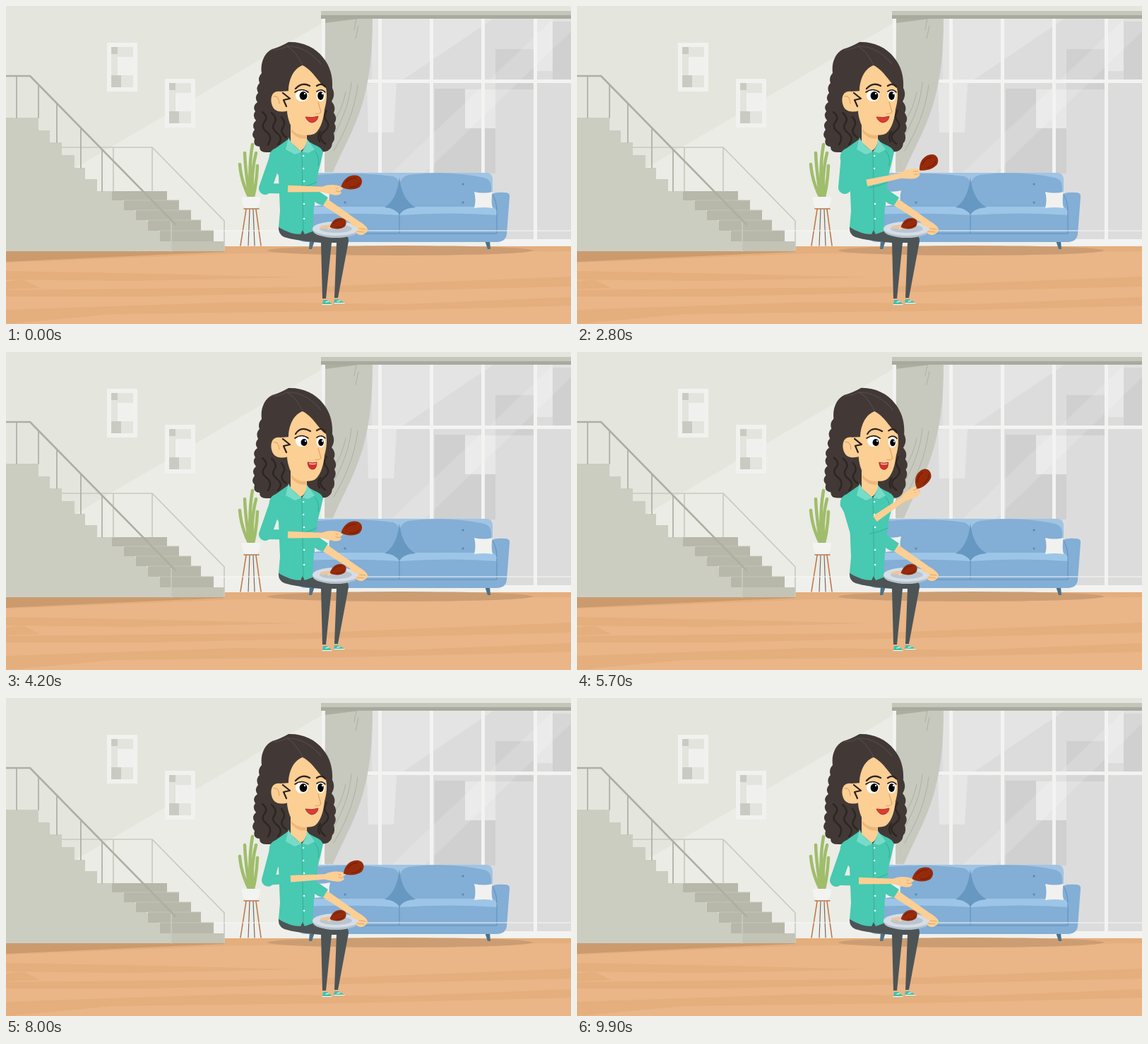
Write an HTML page that moves like this. It is 800 px wide and 450 px high and loops after 10000 ms.

```html
<!DOCTYPE html>
<html lang="en">
<head>
<meta charset="utf-8">
<title>Snack on the sofa</title>
<style>
html, body { margin: 0; width: 100%; height: 100%; overflow: hidden; background: #e4e5dd; }
svg { display: block; width: 100vw; height: 100vh; }
.line { fill: none; stroke-linecap: round; stroke-linejoin: round; }
.teal { fill: #48c9b1; }
.skin { fill: #fccf94; }
</style>
</head>
<body>
<svg viewBox="0 0 800 450">
<defs>
  <g id="picture">
    <path fill="#f1f2ef" d="M143 52h43v69h-43z"/>
    <path fill="#e2e4dd" d="M149 58h31v57h-31z"/>
    <path fill="#c9cbc3" d="M149 58h9v10h-9zM149 98h14v17h-14z"/>
    <path fill="#f0f1ef" d="M158 72h22v26h-22z"/>
  </g>
  <g id="drumstick">
    <path class="line" stroke="#f3cfa4" stroke-width="3.5" d="M-12 5L-18 8"/>
    <path fill="#962b0b" d="M-15 5C-11-6-3-11 6-10C16-9 18 1 11 7C4 11-8 10-15 5Z"/>
    <path class="line" stroke="#7b1e07" stroke-width="1.3" d="M-8-1Q-1-8 7-6M-3 6Q6 8 11 2"/>
  </g>
</defs>

<!-- wall -->
<path fill="#e4e5dd" d="M0 0h800v345H0z"/>
<path fill="#ebece5" d="M450 23L100 228V342H450z"/>
<path fill="#eff0ec" d="M290 318h510v24H290z"/>
<use href="#picture"/>
<use href="#picture" x="82" y="51"/>

<!-- window -->
<g>
  <path fill="#dcdcdd" d="M450 18H800V331H450z"/>
  <path fill="#e4e4e4" d="M518 18H690L518 134z"/>
  <path fill="#d0d0d1" d="M693 61h54v57h-54zM607 117h43v29h43v91h-86zM774 22h26v84h-26z"/>
  <path fill="#e7e7e8" d="M511 110h42l-4 69h-36zM650 118h43v55h-43zM751 18h23v74h-23z"/>
  <path fill="#fff" opacity=".14" d="M775 18H800V36L592 237H545z"/>
  <path fill="#f3f3f2" d="M447 18h5v218h-5zM527 18h5v220h-5zM600 18h5v220h-5zM673 18h5v220h-5zM747 18h5v315h-5zM450 104h350v5H450zM700 330h100v9H700z"/>
</g>
<path fill="#c8c9be" d="M452 18H519C519 60 516 95 508 125C499 165 479 198 463 235H451z"/>
<path fill="#adaea2" d="M452 18h48l-48 6z"/>
<path class="line" stroke="#afb0a5" stroke-width="1" d="M496 18L493 34M499 28L495 46M489 108C486 140 476 160 464 184M498 112C493 150 480 178 464 205M481 122Q476 146 466 160"/>
<path fill="#c5c6bb" d="M446 7h354v7H446z"/>
<path fill="#a9aa9e" d="M446 13h354v5H446z"/>

<!-- floor -->
<path fill="#eab587" d="M0 340h800v110H0z"/>
<g fill="#e4ae7d">
  <path d="M0 340H800V347L330 350L0 363z"/>
  <path d="M0 375L215 379L412 384L180 389L0 387z"/>
  <path d="M24 387L48 399L0 401V390zM0 402L420 398L800 383V397L470 405L200 411L0 411z"/>
  <path d="M0 430L330 419L560 422L800 412V424L520 431L150 436L0 450z"/>
</g>
<path fill="#cb9b6e" d="M0 346H309V348L130 356L0 362z"/>
<ellipse cx="558" cy="346" rx="188" ry="7" fill="#cc9d72"/>

<!-- stairs -->
<path fill="#cccdc1" d="M0 158H46V176H62V193H79V211H97V229H112V245H129V262H150L234 333V347H0z"/>
<path fill="#b7b8a9" d="M150 262H228V275H245V289H262V303H276V318H294V333H309V347H234V333H218V318H201V303H184V289H167V275H150z"/>
<path fill="#c3c4b6" d="M234 333h75v14h-75z"/>
<path class="line" stroke="#c4c5b8" d="M167 275h78M184 289h78M201 303h75M218 318h76"/>
<path class="line" stroke="#c9cac0" stroke-width="1.7" d="M79 200H207L309 304V346M152 200V262M207 200V262M234 306V347"/>
<path class="line" stroke="#aeafa3" stroke-width="1.7" d="M15 99V158M46 111V158M72 138V193M106 172V229M136 203V262"/>
<path class="line" stroke="#aeafa3" stroke-width="2.6" d="M0 99H34L240 309"/>

<!-- plant -->
<path class="line" stroke="#bd784c" stroke-width="1.6" d="M337 287H358M340 288L332 339M354 288L361 339"/>
<path class="line" stroke="#7b6a60" stroke-width="1.2" d="M345 288L343 339M350 288L352 339"/>
<path class="line" stroke="#a0bd6c" stroke-width="4.5" d="M344 270Q333 248 331 224M345 270Q339 235 338 208M347 270Q343 230 349 196M349 270Q347 235 354 208M350 270Q355 250 356 226"/>
<path fill="#f3f3f1" d="M334 270H360Q360 286 352 286H341Q334 286 334 270z"/>

<!-- sofa -->
<path fill="#4d7188" d="M430 332h7l-4 12h-4zM678 332h7l1 12h-4z"/>
<path fill="#a1c4e3" d="M420 236H680Q689 236 689 246V290H420z"/>
<path fill="#83aed5" d="M420 241Q490 233 548 241Q557 244 557 254V290H420zM557 254Q558 242 570 239Q625 232 677 243Q687 246 687 256V290H557z"/>
<path fill="#83aed5" d="M688 267Q691 263 706 264Q714 264 713 270L709 323Q708 333 696 334H425Q411 334 412 320H688z"/>
<path fill="#83aed5" d="M420 284H695V322H420z"/>
<path fill="#9dc5e7" d="M420 284H548Q557 284 556 296Q500 292 420 295zM557 296Q556 284 566 284H688Q695 285 695 296Q630 291 557 296z"/>
<path fill="#6698c1" d="M557 242Q554 274 536 285Q552 286 557 296Q562 286 580 285Q560 274 557 242z"/>
<path class="line" stroke="#5c8fba" stroke-width="1" d="M557 296V321M430 322H695V292M688 265Q695 276 695 290"/>
<path class="line" stroke="#5588b5" stroke-width="3" d="M480 278h.1M647 252h.1M647 278h.1"/>
<path fill="#f1f1ef" d="M663 263Q676 266 689 263Q686 275 689 286Q676 284 663 286Q666 275 663 263zM437 262Q448 264 459 261Q456 272 459 283Q448 281 437 283z"/>
<path stroke="#f7f8f7" stroke-width="1.2" d="M294 318H800"/>

<!-- legs -->
<path fill="#4d5456" d="M386 312L434 318L475 322Q486 324 485 333L470 413H465L468 335H461L453 414H448L446 335Q410 332 394 327Q385 323 386 312z"/>
<path fill="#42c2aa" d="M449 416h5q5 2 7 6h-13zM465 415h5q6 2 9 5h-15z"/>
<path class="line" stroke="#fff" stroke-width="1.2" d="M448 422.5H461M465 420.5H479M453 419l4-1M469 418l4-1"/>

<g class="head">
  <path fill="#423936" d="M400 51C418 50 438 58 449 73C459 85 463 100 462 116C466 124 464 130 461 135q7 8 3 16q6 8 1 15q4 7-1 14q3 9-2 14q-1 10-10 12L440 207H370q-11 1-11-8q-10-1-7-11q-6-6 0-13q-5-7 2-13q-6-7-1-13q-5-7 3-13q-5-7 1-13q-4-8 2-14q-3-8 3-14C360 80 366 66 377 61Q388 58 400 51z"/>
  <g class="line" stroke="#2d2623" stroke-width="2.5">
    <path d="M363 150q9 7 3 14t3 14t2 18M376 151q9 8 4 15t4 14t1 16M390 157q7 8 2 15t5 14"/>
    <path d="M454 148q-6 8 0 15t-4 15t2 17M445 178q-5 7-1 14"/>
  </g>
  <path class="line" stroke="#51484a" stroke-width="1.2" d="M378 62Q390 62 397 57Q424 56 446 82M397 57Q410 63 420 84"/>
</g>

<!-- torso -->
<path class="skin" d="M403 165V195Q413 216 426 196V175z"/>
<path fill="#ecb87b" d="M404 174Q412 184 425 183V188Q411 188 404 178z"/>
<path class="teal" d="M399 189L382 201Q371 205 373 218L386 240L388 290L386 313Q402 323 417 323L420 317L423 323L434 319L436 284L441 240Q445 225 449 207Q447 200 436 196L427 191L419 207z"/>
<path fill="#78dbc8" d="M400 186L396 203L409 210L419 206Q406 200 400 186zM426 188L437 203L428 208L419 206Q426 200 426 188z"/>
<path class="line" stroke="#35ad97" stroke-width="1" d="M419 207L421 317M414 257Q428 255 440 249M437 205Q445 214 442 226"/>
<path class="line" stroke="#e7fff8" stroke-width="2.6" d="M421 212h.1M421 230h.1M422 248h.1M422 280h.1M422 301h.1"/>

<!-- far arm with plate -->
<path class="skin" d="M447 281L455 273L499 304Q513 312 512 318Q506 327 497 322L488 307z"/>
<path class="teal" d="M434 256L456 271L449 282Q442 282 432 273z"/>
<ellipse cx="467" cy="317" rx="33" ry="11" fill="#b5c0cb"/>
<ellipse cx="467" cy="315" rx="33" ry="10" fill="#d5dee6"/>
<ellipse cx="467" cy="315" rx="23" ry="6" fill="#b9c6d2"/>
<path class="line" stroke="#f0c696" stroke-width="4" d="M447 313L459 312"/>
<use href="#drumstick" transform="translate(470 308) rotate(-4) scale(.78)"/>
<path class="skin" d="M487 309Q500 303 510 313Q514 320 504 324Q496 324 495 319L500 315z"/>
<path class="line" stroke="#e1a66c" stroke-width="1" d="M497 319L507 320M500 315L509 316"/>

<!-- near arm, passing behind the chin -->
<path id="forearm" class="skin"/>
<path id="sleeve-low" class="line" stroke="#48c9b1" stroke-width="14" style="stroke-linecap:butt"/>
<path id="sleeve-up" class="line" stroke="#48c9b1" stroke-width="18"/>
<g id="hand">
  <path class="skin" d="M-15-4Q-5-8 6-6L13-4Q15 0 10 1L12 4Q10 8 3 8Q-4 7-15 4z"/>
  <path class="line" stroke="#e1a66c" stroke-width="1" d="M4-2L11-1M4 2L10 3"/>
</g>

<!-- face -->
<g class="head">
  <path class="skin" d="M388 121C373 119 373 138 380 146Q387 152 400 148L403 120z"/>
  <path class="skin" d="M420 84C408 88 401 102 400 118L398 150C399 160 403 172 409 177C418 184 432 184 438 180C446 174 450 158 451 146C454 136 455 124 453 116C443 110 436 92 420 84z"/>
  <path class="line" stroke="#e0a468" stroke-width="1.2" d="M379 128Q386 126 387 138M442 136L446 150Q443 154 438 152"/>
  <path class="line" stroke="#29211f" stroke-width="2.2" d="M392 123L402 131L393 133L397 142"/>
  <g id="eyes-normal">
    <path class="line" stroke="#302521" stroke-width="2.4" d="M410 117Q419 107 430 113M440 113Q447 108 452 114"/>
    <ellipse cx="419" cy="127" rx="9" ry="8" fill="#fff"/><ellipse cx="445.5" cy="127" rx="6" ry="8" fill="#fff"/>
    <ellipse cx="421" cy="127" rx="5.4" ry="6"/><ellipse cx="445.5" cy="127" rx="4.3" ry="6"/>
    <path fill="#fff" d="M422 123h2v2h-2zM447 123h2v2h-2z"/>
  </g>
  <g id="eyes-wide">
    <path class="line" stroke="#302521" stroke-width="2.2" d="M410 116Q417 104 431 112M440 111Q447 106 452 113"/>
    <ellipse cx="419" cy="126" rx="9" ry="8" fill="#fff"/><ellipse cx="445.5" cy="127" rx="6" ry="8" fill="#fff"/>
    <ellipse cx="422" cy="128" rx="4.5" ry="5"/><ellipse cx="446" cy="128" rx="3.8" ry="5"/>
    <path fill="#fff" d="M423 125h2v2h-2zM447 125h2v2h-2z"/>
  </g>
  <path id="lashes" class="line" stroke="#231b19" stroke-width="1.6" d="M409 122Q419 115 428 122M440 121Q447 116 452 122"/>
  <g id="eyes-closed">
    <path class="line" stroke="#302521" stroke-width="2.4" d="M410 117Q419 108 430 114M440 114Q447 109 452 115"/>
    <path fill="#e6bd85" d="M410 128Q418 115 428 129zM438 129Q445 117 452 128z"/>
    <path class="line" stroke="#231b19" stroke-width="2.2" d="M411 128Q420 131 428 129M438 130Q446 131 451 127"/>
  </g>
  <path id="smile" fill="#de3b35" stroke="#9e2420" stroke-width=".8" d="M424 157Q434 159 442 156Q441 164 433 165Q427 164 424 157z"/>
  <g id="open">
    <path fill="#d8302c" stroke="#9e2420" stroke-width=".8" d="M427 156Q434 158 440 156Q440 167 433 166Q428 165 427 156z"/>
    <path fill="#f6d9d2" d="M429 157.2Q434 158.6 439 157.2V158.4Q434 160 429 158.4z"/>
  </g>
</g>
<use id="food" href="#drumstick"/>
</svg>
<script>
const LOOP = 10000, BITE = 2650, STEP = 100;
const SHOULDER = [383, 212], REACH = 96, CUFF = 32;

// elbow x, elbow y, forearm angle, food x, food y, food angle, head lean
const rest = [367, 258, 1, 489, 250, -4, 0];
const lifted = [379, 257, -12, 497, 222, -22, 0];
const raised = [398, 254, -31, 494, 182, -45, .12];
const mouth = [373, 257, -68, 441, 158, -38, 1];
const keys = [[0, rest], [150, lifted], [380, raised], [580, mouth], [800, mouth], [1000, raised], [1250, rest], [BITE, rest]];

const el = id => document.getElementById(id);
const heads = document.querySelectorAll('.head');
const show = (id, on) => { el(id).style.display = on ? '' : 'none'; };

function poseAt(phase) {
  const i = keys.findIndex(k => k[0] > phase);
  const [t0, a] = keys[i - 1], [t1, b] = keys[i];
  const k = (phase - t0) / (t1 - t0);
  return a.map((v, n) => v + (b[n] - v) * k);
}

function draw(time) {
  const phase = time % BITE;
  const [ex, ey, angle, fx, fy, turn, lean] = poseAt(phase);
  const rad = angle * Math.PI / 180, dx = Math.cos(rad), dy = Math.sin(rad);
  const at = (along, side) => `${ex + dx * along - dy * side} ${ey + dy * along + dx * side}`;

  el('sleeve-up').setAttribute('d', `M${SHOULDER}L${ex} ${ey}`);
  el('sleeve-low').setAttribute('d', `M${ex} ${ey}L${at(CUFF, 0)}`);
  el('forearm').setAttribute('d', `M${at(25, -5)}L${at(88, -3.5)}L${at(88, 3.5)}L${at(25, 5)}Z`);
  el('hand').setAttribute('transform', `translate(${at(REACH, 0)}) rotate(${angle})`);
  el('food').setAttribute('transform', `translate(${fx} ${fy}) rotate(${turn})`);
  heads.forEach(h => h.setAttribute('transform', `translate(${2 * lean} 0) rotate(${3 * lean} 412 185)`));

  const closed = phase >= 950 && phase < 1100;
  const wide = !closed && phase >= 400 && phase < 1700;
  const open = phase >= 350 && phase < 1850;
  show('eyes-closed', closed);
  show('eyes-wide', wide);
  show('eyes-normal', !closed && !wide);
  show('lashes', !closed);
  show('open', open);
  show('smile', !open);
}

const start = performance.now();
function tick() {
  const time = (performance.now() - start) % LOOP;
  draw(Math.floor(time / STEP) * STEP);
  requestAnimationFrame(tick);
}
tick();
</script>
</body>
</html>
```
